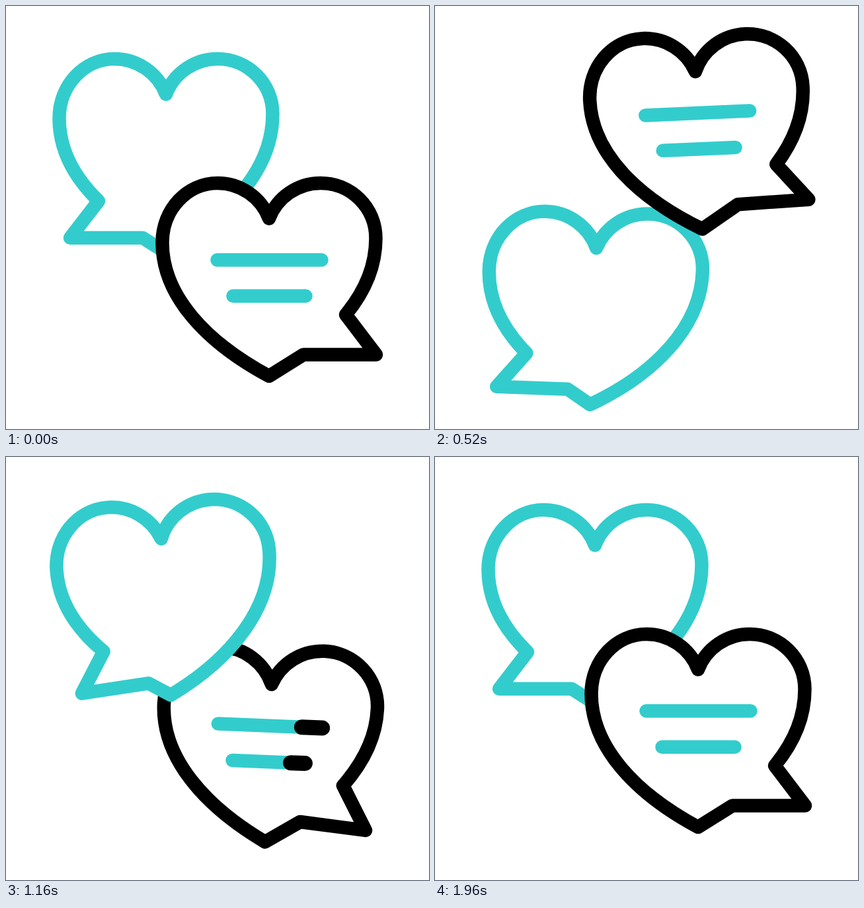
An HTML page for the animation above (2000 ms loop, 640x640 px).

```html
<!DOCTYPE html>
<html lang="en">
<head>
<meta charset="utf-8">
<title>Heart chat</title>
<style>
  html, body { margin: 0; width: 100%; height: 100%; overflow: hidden; background: #fff; }
  svg { display: block; width: 100vw; height: 100vh; }
  path, line { fill: #fff; stroke-width: 20.5; stroke-linecap: round; stroke-linejoin: round; }
  .teal { stroke: #33cccc; }
  .black { stroke: #000; }
  .typed { stroke: #000; stroke-width: 23; }
</style>
</head>
<body>
<svg id="stage" viewBox="0 0 640 640">
  <g id="tealHeart"><path class="teal"/></g>
  <g id="blackHeart">
    <path class="black"/>
    <line class="teal" x1="319.5" x2="477.5" y1="384.3" y2="384.3"/>
    <line class="teal" x1="343.5" x2="453.5" y1="438.8" y2="438.8"/>
    <line class="typed" y1="384.3" y2="384.3"/>
    <line class="typed" y1="438.8" y2="438.8"/>
  </g>
</svg>
<script>
  const LOOP = 2000, STEP = 40;
  const stage = document.getElementById('stage');
  const teal = document.getElementById('tealHeart');
  const black = document.getElementById('blackHeart');
  const typed = [...document.querySelectorAll('.typed')];
  const spans = [[319.5, 477.5], [343.5, 453.5]];

  const ease = s => s * s * (3 - 2 * s);
  const mix = (a, b, p) => a + (b - a) * p;

  // Eased value at time t along [time, value] keys
  function track(t, keys) {
    if (t <= keys[0][0]) return keys[0][1];
    for (let i = 1; i < keys.length; i++) {
      const [t0, a] = keys[i - 1], [t1, b] = keys[i];
      if (t < t1) return mix(a, b, ease((t - t0) / (t1 - t0)));
    }
    return keys[keys.length - 1][1];
  }

  const travel = (t, far, over) => track(t, [[80, 0], [600, far], [1320, over], [1880, 0]]);
  const swing = (t, first, second) =>
    track(t, [[80, 0], [320, first], [600, 0], [920, second], [1320, 0]]);

  // Tail joint: rest point bent by an upward and then a downward offset
  function joint(t, [x, y], up, down) {
    const u = track(t, [[80, 0], [320, 1], [600, 0]]);
    const d = track(t, [[600, 0], [830, 1], [1320, 0]]);
    return [x + up[0] * u + down[0] * d, y + up[1] * u + down[1] * d];
  }

  // Both lobes, from the left side over the notch to the right side
  const lobes = (x, y) => {
    const p = (dx, dy) => `${x + dx},${y + dy} `;
    return 'M' + p(-161.5, 36.5) +
      'C' + p(-161.5, -13.5) + p(-124, -53.5) + p(-78, -53.5) +
      'C' + p(-43.4, -53.5) + p(-12.4, -32.3) + p(0, 0) +
      'C' + p(12.4, -32.3) + p(43.4, -53.5) + p(78, -53.5) +
      'C' + p(124, -53.5) + p(161.5, -16.5) + p(161.5, 30);
  };

  function tealPath(t) {
    const neck = joint(t, [140, 295], [0, 0], [7, 7]);
    const tip = joint(t, [97, 350.8], [-5, -21], [28.5, 26.6]);
    const inner = joint(t, [207, 350.8], [-16, -13.5], [-4, -2.5]);
    return lobes(242, 133.5) + `C403.5,250 332,324 238,370.5 L${inner} L${tip} L${neck}` +
      'C102,258 80.5,216 80.5,170Z';
  }

  function blackPath(t) {
    const neck = joint(t, [514, 467], [0, 0], [-6.5, 12]);
    const tip = joint(t, [560, 527.5], [4, -26], [-43, 35]);
    const inner = joint(t, [450, 527.5], [17, -12], [-1, 0]);
    return lobes(398, 321.5) + `C559.5,393 543,432 ${neck} L${tip} L${inner} L398,560` +
      'C305,510 236.5,440 236.5,358Z';
  }

  function pose(group, d, dy, angle, cx, cy) {
    group.firstElementChild.setAttribute('d', d);
    group.setAttribute('transform', `translate(0 ${dy}) rotate(${angle} ${cx} ${cy})`);
  }

  function draw(t) {
    pose(teal, tealPath(t), travel(t, 248.5, -47.5), swing(t, 6.8, -12.7), 242, 225.5);
    pose(black, blackPath(t), travel(t, -237.5, 60), swing(t, -12.7, 6.8), 398, 414);

    const head = track(t, [[520, 0], [1080, 1]]);
    const back = track(t, [[760, 0], [1320, 1]]);
    typed.forEach((line, i) => {
      line.setAttribute('x1', mix(...spans[i], back));
      line.setAttribute('x2', mix(...spans[i], head));
      line.style.visibility = head > back ? 'visible' : 'hidden';
    });

    const front = t >= 600 && t < 1320 ? teal : black;
    if (stage.lastElementChild !== front) stage.append(front);
  }

  const start = performance.now();
  function tick() {
    // The motion runs at 25 steps a second; the small lead absorbs timer rounding
    const t = (performance.now() - start + 4) % LOOP;
    draw(Math.floor(t / STEP) * STEP);
    requestAnimationFrame(tick);
  }
  tick();
</script>
</body>
</html>
```
